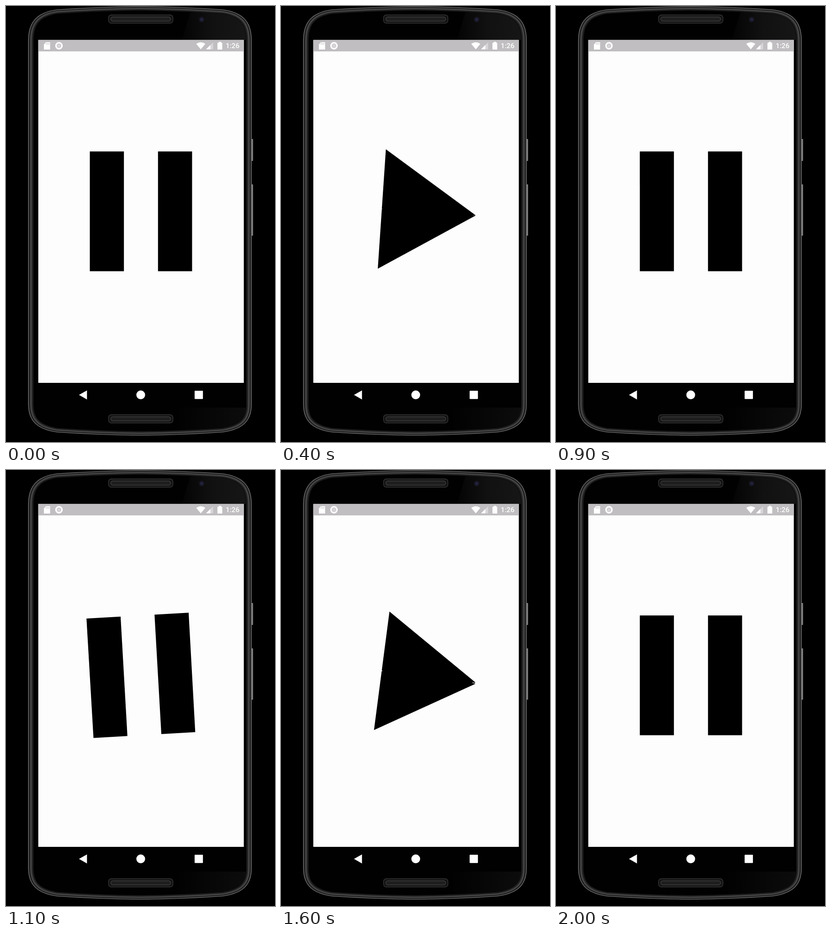
Animation of 589x951 px, one loop 2100 ms. Source, as an HTML page with a canvas:

```html
<!DOCTYPE html>
<html lang="en">
<head>
<meta charset="utf-8">
<title>Play and pause</title>
<style>
html, body { margin: 0; width: 100%; height: 100%; overflow: hidden; background: #000; }
canvas { display: block; }
</style>
</head>
<body>
<canvas id="stage" width="589" height="951"></canvas>
<script>
const ctx = document.getElementById('stage').getContext('2d');
const LOOP = 2100, STEP = 100;
const UNIT = 18.66, CX = 295.5, CY = 447.8;
// [ms, phase in degrees]: 0 is pause, 180 is play, 360 is pause again
const PHASES = [[0, 0], [400, 156], [700, 300], [800, 348], [900, 359], [1000, 364], [1100, 382],
  [1200, 395], [1300, 436], [1600, 573.5], [1800, 680.5], [1900, 716], [2000, 720], [2100, 720]];

const lerp = (a, b, k) => a + (b - a) * k;
const ease = k => (1 - Math.cos(Math.PI * k)) / 2;

function poly(points, fill) {
  ctx.beginPath();
  points.forEach(([x, y]) => ctx.lineTo(x, y));
  ctx.closePath();
  ctx.fillStyle = fill;
  ctx.fill();
}

function box(x, y, w, h, r, fill, stroke) {
  ctx.beginPath();
  ctx.roundRect(x, y, w, h, r);
  if (fill) { ctx.fillStyle = fill; ctx.fill(); }
  if (stroke) { ctx.strokeStyle = stroke; ctx.lineWidth = 1.4; ctx.stroke(); }
}

function disc(x, y, r, fill) {
  ctx.beginPath();
  ctx.arc(x, y, r, 0, 2 * Math.PI);
  ctx.fillStyle = fill;
  ctx.fill();
}

// Phone outline, shrunk by d on every side
function shell(d) {
  const l = 48.5 + d, r = 538 - d, m = 293, v = d * 0.8;
  const t = 1.5 + v, b = 936 - v;
  ctx.beginPath();
  ctx.moveTo(l, 76);
  ctx.bezierCurveTo(l, 40, 62 + d, 14 + v, 112, 7.5 + v);
  ctx.quadraticCurveTo(200, t, m, t - 1);
  ctx.quadraticCurveTo(390, t, 474, 7.5 + v);
  ctx.bezierCurveTo(525 - d, 14 + v, r, 40, r, 76);
  ctx.lineTo(r, 868);
  ctx.bezierCurveTo(r, 900, 525 - d, 923 - v, 474, 930 - v);
  ctx.quadraticCurveTo(390, b, m, b + 1);
  ctx.quadraticCurveTo(200, b, 112, 930 - v);
  ctx.bezierCurveTo(62 + d, 923 - v, l, 900, l, 868);
  ctx.closePath();
}

function fillShell(d, fill) {
  shell(d);
  ctx.fillStyle = fill;
  ctx.fill();
}

function grille(y) {
  box(224.5, y, 141, 18, 6, '#131314', '#363637');
  box(229.5, y + 4.5, 131, 9, 4.5, '#1e1e1f', '#3d3d3e');
}

function phone() {
  ctx.fillStyle = '#000';
  ctx.fillRect(0, 0, 589, 951);

  box(537, 290, 4, 48, 1, '#7c7c7d');
  box(537, 389, 4, 112, 1, '#7c7c7d');
  box(270, 933, 47, 4, 2, '#242425');

  fillShell(0, '#727273');
  fillShell(1.5, '#1c1c1d');
  fillShell(4.5, '#464647');
  fillShell(7.5, '#2c2c2d');
  fillShell(9.5, '#181819');
  fillShell(12, '#010101');

  // Soft sheen on the glass
  ctx.save();
  shell(12.5);
  ctx.clip();
  const glow = ctx.createLinearGradient(380, 0, 525, 0);
  glow.addColorStop(0, '#030303');
  glow.addColorStop(0.5, '#111112');
  glow.addColorStop(1, '#161617');
  poly([[405, 10], [530, 10], [530, 74], [385, 74]], glow);
  const low = ctx.createLinearGradient(370, 0, 525, 0);
  low.addColorStop(0, '#010101');
  low.addColorStop(1, '#0c0c0c');
  poly([[370, 876], [530, 876], [530, 925], [352, 925]], low);
  ctx.restore();

  grille(19.5);
  grille(891.5);
  disc(428.5, 29.5, 6.5, '#131319');
  disc(428.5, 29.5, 4, '#20203a');
}

function statusBar() {
  ctx.fillStyle = '#c0bec0';
  ctx.fillRect(70.7, 73.8, 450, 25.2);

  poly([[87.5, 79], [96.5, 79], [96.5, 95], [83, 95], [83, 84]], '#fff');
  ctx.fillStyle = '#c8c6c8';
  [87.3, 90.2, 93.1].forEach(x => ctx.fillRect(x, 81, 1.4, 3.2));

  disc(116, 86.8, 8.2, '#fff');
  disc(116, 86.8, 5, '#cecccf');
  disc(116, 86.8, 3, '#d9d7d9');

  ctx.beginPath();
  ctx.moveTo(426.5, 94.5);
  ctx.lineTo(416.5, 82.5);
  ctx.quadraticCurveTo(426.5, 75.5, 436.5, 82.5);
  ctx.closePath();
  ctx.fillStyle = '#fff';
  ctx.fill();

  poly([[453.5, 79], [453.5, 94.5], [438, 94.5]], '#d8d6d8');
  poly([[447.5, 85], [447.5, 94.5], [438, 94.5]], '#fff');

  box(463, 80, 10.5, 15, 1, '#fff');
  ctx.fillRect(465.8, 78.2, 5, 2.5);

  ctx.font = '500 15.3px Roboto, "Noto Sans", sans-serif';
  ctx.textBaseline = 'alphabetic';
  ctx.fillText('1:26', 481, 92);
}

function navBar() {
  poly([[159.8, 848.2], [177.3, 838.4], [177.3, 858.2]], '#fff');
  disc(295, 848.2, 9.6, '#fff');
  box(413, 839.3, 18.2, 18, 1, '#fff');
}

function symbol(turn) {
  const k = ease(turn);
  const top = lerp(-7, -4, k), inner = lerp(2, 0, k);
  const wide = lerp(6, 7, k), narrow = lerp(6, 0, k);
  ctx.save();
  ctx.translate(CX, CY);
  ctx.rotate(-turn * Math.PI / 2);
  ctx.scale(UNIT, UNIT);
  for (const s of [-1, 1]) {
    poly([[s * wide, top], [s * inner, top], [s * inner, 7], [s * narrow, 7]], '#000');
  }
  // Close the hairline seam once the halves meet
  if (k > 0.97) ctx.fillRect(-inner - 0.1, top + 0.08, 2 * inner + 0.2, 6.6 - top);
  ctx.restore();
}

function phaseAt(t) {
  const i = PHASES.findIndex(([ms]) => ms > t);
  const [t0, a] = PHASES[i - 1], [t1, b] = PHASES[i];
  return lerp(a, b, (t - t0) / (t1 - t0));
}

function frame(now) {
  const t = Math.floor(now % LOOP / STEP) * STEP;
  phone();
  ctx.fillStyle = '#fefdfe';
  ctx.fillRect(70.7, 74, 450, 748);
  statusBar();
  ctx.filter = 'blur(0.5px)';
  navBar();
  symbol(ease(phaseAt(t) / 180));
  ctx.filter = 'none';
}

let start;
function tick(now) {
  if (start === undefined) start = now;
  frame(Math.max(0, now - start));
  requestAnimationFrame(tick);
}
frame(0);
requestAnimationFrame(tick);
</script>
</body>
</html>
```
